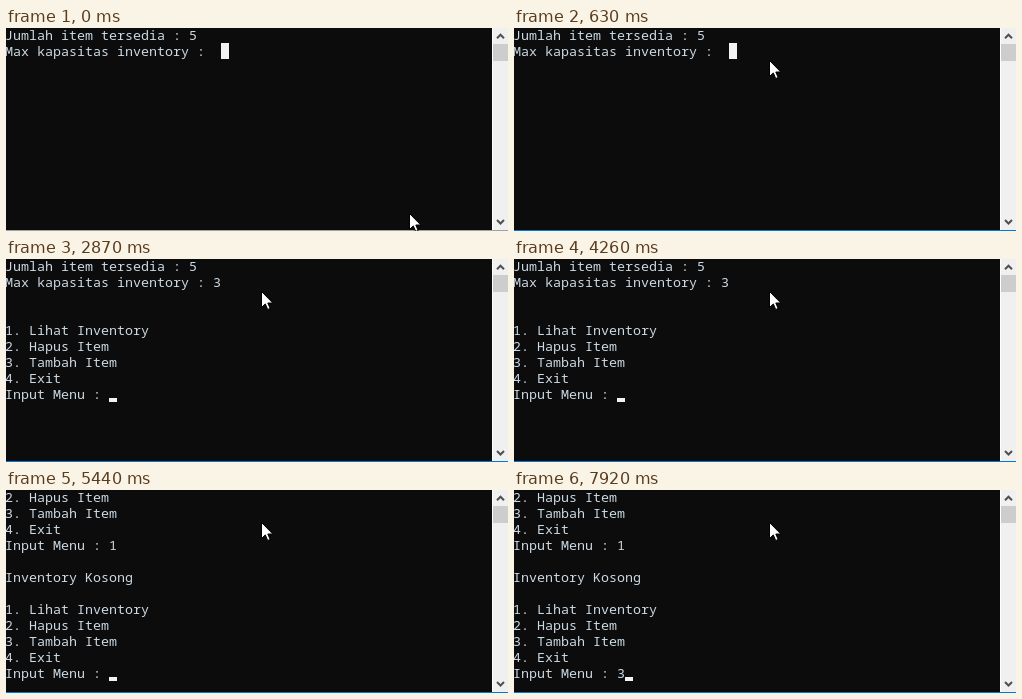
An HTML page with a canvas for the animation above (8000 ms loop, 502x203 px).

```html
<!DOCTYPE html>
<html lang="id">
<head>
<meta charset="utf-8">
<title>Inventory console</title>
<style>
  html, body { margin: 0; width: 100%; height: 100%; overflow: hidden; background: #0c0c0c; }
  #stage { position: absolute; left: 0; top: 0; width: 502px; height: 203px; overflow: hidden; }
  pre {
    position: absolute; left: -1px; top: -1px; margin: 0; color: #cbd9e4;
    font: 13.3333px/16px "Noto Sans Mono", "DejaVu Sans Mono", monospace;
    font-variant-ligatures: none;
  }
  canvas { position: absolute; left: 0; top: 0; }
</style>
</head>
<body>
<div id="stage"><pre id="text"></pre><canvas id="art" width="502" height="203"></canvas></div>
<script>
const LOOP = 8000, W = 502, H = 203, CELL = 8, ROW = 16;
const FOCUS = 530, SIZE_KEY = 2250, MENU = 2870, VIEW_KEY = 5120, REPLY = 5440, ADD_KEY = 7380;
const BLINK_START = 1032, BLINK = 529;
const text = document.getElementById('text');
const ctx = document.getElementById('art').getContext('2d');

const intro = 'Jumlah item tersedia : 5\nMax kapasitas inventory : ';
const menu = '1. Lihat Inventory\n2. Hapus Item\n3. Tambah Item\n4. Exit\nInput Menu : ';

function screenText(t) {
  const typed = (key, at) => t >= at ? key : '';
  if (t < MENU) return intro + typed('3', SIZE_KEY);
  if (t < REPLY) return intro + '3\n\n\n' + menu + typed('1', VIEW_KEY);
  const scrolled = menu.slice(menu.indexOf('\n') + 1);
  return scrolled + '1\n\nInventory Kosong\n\n' + menu + typed('3', ADD_KEY);
}

// A steady blink; a key restarts its phase and new output keeps it lit.
function caretOn(t) {
  if (t < BLINK_START) return false;
  const fresh = at => t >= at && t < at + 400;
  const tick = Math.floor((t - BLINK_START) / BLINK) + (t >= VIEW_KEY ? 1 : 0);
  return tick % 2 === 0 || fresh(MENU) || fresh(REPLY);
}

function rect(color, x, y, w, h) {
  ctx.fillStyle = color;
  ctx.fillRect(x, y, w, h);
}

function drawCaret(t, screen) {
  if (t < SIZE_KEY) rect('#f2f2f2', 215, 15, CELL, ROW);
  if (!caretOn(t)) return;
  const lines = screen.split('\n');
  const col = lines[lines.length - 1].length;
  rect('#f2f2f2', col * CELL - 1, lines.length * ROW - 5, CELL, 4);
}

function chevron(y, dir) {
  ctx.strokeStyle = '#505050';
  ctx.lineWidth = 2;
  ctx.beginPath();
  ctx.moveTo(491, y + 2 * dir);
  ctx.lineTo(494.5, y - 1.5 * dir);
  ctx.lineTo(498, y + 2 * dir);
  ctx.stroke();
}

function drawFrame(t) {
  rect('#f0f0f0', 486, 0, 16, 202);
  rect('#fff', 486, 0, 1, 202);
  rect('#cdcdcd', 487, 16, 15, 17);
  chevron(8.2, 1);
  chevron(194, -1);
  rect(t < FOCUS ? '#a0a0a0' : '#0078d7', 0, 202, W, 1);
}

const arrow = new Path2D('M.5 .5V16.5L4.3 12.9 6.7 18.5 9.2 17.5 6.8 12H11.8Z');

// Moves in six steps, slightly past its goal and back.
function drawPointer(t) {
  const q = 1 - Math.min(1, Math.floor((t + 10) / 78) / 6);
  const ease = 1 - q * q;
  const back = 1 - 2.6 * q ** 3 + 1.6 * q * q;
  ctx.save();
  ctx.translate(Math.round(403 - 148 * ease), Math.round(185 - 153 * back));
  ctx.fillStyle = '#fff';
  ctx.strokeStyle = '#000';
  ctx.lineWidth = 1;
  ctx.fill(arrow);
  ctx.stroke(arrow);
  ctx.restore();
}

function draw(t) {
  const screen = screenText(t);
  if (text.textContent !== screen) text.textContent = screen;
  ctx.clearRect(0, 0, W, H);
  drawCaret(t, screen);
  drawFrame(t);
  drawPointer(t);
}

const start = performance.now();
function tick() {
  draw(Math.max(0, performance.now() - start) % LOOP);
  requestAnimationFrame(tick);
}
tick();
</script>
</body>
</html>
```
